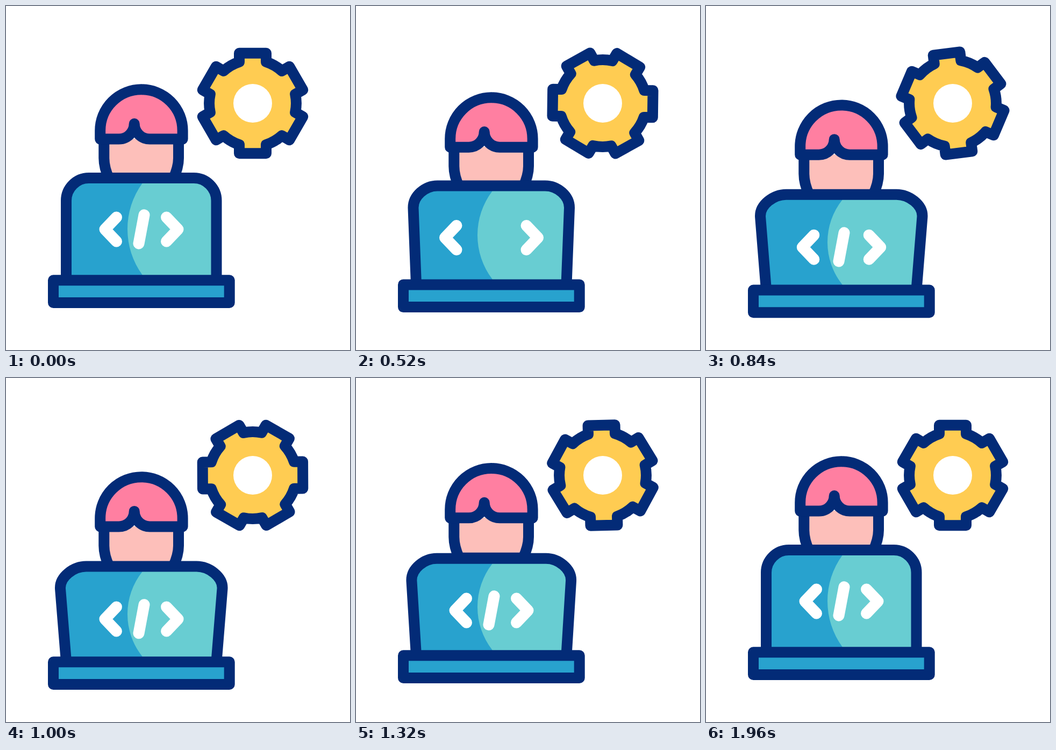
Recreate the animation shown at these times as an HTML page. Size 640x640 px, loop 2000 ms.

```html
<!DOCTYPE html>
<html lang="en">
<head>
<meta charset="utf-8">
<title>Developer at work</title>
<style>
  html, body { margin: 0; width: 100%; height: 100%; overflow: hidden; background: #fff; }
  svg { display: block; width: 100vw; height: 100vh; }
  .line { stroke: #032b77; stroke-width: 20; stroke-linecap: round; stroke-linejoin: round; }
  .code { fill: none; stroke: #fff; stroke-width: 21; stroke-linecap: round; stroke-linejoin: round; }
</style>
</head>
<body>
<svg viewBox="0 0 640 640">
  <defs><clipPath id="screenClip"><path id="clipShape"/></clipPath></defs>

  <g transform="translate(459 181)">
    <path id="gear" class="line" fill="#ffcc52"/>
    <circle r="36" fill="#fff"/>
  </g>

  <g id="head">
    <path class="line" fill="#fdbfba" d="M182.3 247V283C182.3 297 186 309 192 322H311C317 309 321 297 321 283V247"/>
    <path class="line" fill="#ff7fa1" d="M175.2 247.6V232A76.7 76.7 0 0 1 328.6 232V247.6H267.5A28.7 28.7 0 0 1 238.7 219A28.7 28.7 0 0 1 210 247.6Z"/>
  </g>

  <path id="screen" fill="#28a2ce"/>
  <path id="shine" fill="#68cdd2" clip-path="url(#screenClip)"/>
  <path id="frame" class="line" fill="none"/>

  <g id="code" class="code">
    <path id="less" d="M205.5 393L184 415.5L205.5 438"/>
    <path id="slash"/>
    <path id="greater" d="M298.5 393L320 415.5L298.5 438"/>
  </g>

  <rect id="base" class="line" x="88" y="510.3" width="327.7" height="41.7" fill="#28a2ce"/>
</svg>
<script>
const LOOP = 2000, STEP = 40;
const el = id => document.getElementById(id);
const set = (id, name, value) => el(id).setAttribute(name, value);
const move = (id, x, y) => set(id, 'transform', `translate(${x} ${y})`);

// Ease in and out from 0 to 1; power is the speed at the middle.
function ease(t, from, to, power = 2) {
  const x = Math.min(1, Math.max(0, (t - from) / (to - from)));
  const a = x ** power;
  return a / (a + (1 - x) ** power);
}

// Rise over [up, top], hold, then fall over [leave, down].
const pulse = (t, up, top, leave, down, power) =>
  ease(t, up, top, power) - ease(t, leave, down, power);

function gearPath() {
  const teeth = Array.from({ length: 6 }, (_, i) => {
    const a = i * Math.PI / 3, c = Math.cos(a), s = Math.sin(a);
    const at = (x, y) => `${x * c - y * s} ${x * s + y * c}`;
    return `${at(-25, -77)}L${at(-25, -93.2)}L${at(25, -93.2)}L${at(25, -77)}`;
  });
  return `M${teeth.join('A81 81 0 0 1 ')}A81 81 0 0 1 -25 -77Z`;
}

function screenPath(drop, flare, bottom) {
  const top = 320 + drop, shoulder = 362 + drop;
  const left = 112 - flare, right = 391.5 + flare;
  const inL = 154 - flare * .45, inR = 349.5 + flare * .45;
  const lean = flare * .15;
  return `M112 ${bottom}L${left} ${shoulder}C${left - lean} ${shoulder - 23} ${inL - 23} ${top} ${inL} ${top}` +
    `H${inR}C${inR + 23} ${top} ${right + lean} ${shoulder - 23} ${right} ${shoulder}L391.5 ${bottom}`;
}

function shinePath(top, bottom) {
  const chord = bottom - top, sag = 27.5;
  const r = (chord * chord / 4 + sag * sag) / (2 * sag);
  return `M253.5 ${top}A${r} ${r} 0 0 0 253.5 ${bottom}V${bottom + 12}H420V${top - 12}H253.5Z`;
}

function draw(t) {
  // The head and the screen each sink a little further than the base.
  const base = 18.3 * pulse(t, 180, 900, 900, 1620, 2.1);
  const nod = 11 * pulse(t, 100, 840, 1000, 1720);
  const tilt = 12.6 * pulse(t, 140, 900, 1020, 1880);
  const gap = 18.6 * pulse(t, 0, 500, 500, 1020, 1.7);
  const size = 1 - pulse(t, 120, 440, 520, 800);
  const drop = base + tilt;
  const outline = screenPath(drop, tilt * .87, 510 + base);

  set('gear', 'transform', `rotate(${180 * ease(t, 36, 1481, 2.3)})`);
  move('head', 0, base + nod);
  move('base', 0, base);
  for (const id of ['screen', 'clipShape', 'frame']) set(id, 'd', outline);
  set('shine', 'd', shinePath(330 + drop, 500 + base));

  move('code', 0, drop * 1.08);
  move('less', -gap, 0);
  move('greater', gap, 0);
  set('slash', 'd', `M${252 + 5 * size} ${415.3 - 26.6 * size}L${252 - 5 * size} ${415.3 + 26.6 * size}`);
  set('slash', 'visibility', size > .01 ? 'visible' : 'hidden');
}

set('gear', 'd', gearPath());
const start = performance.now();
function tick() {
  const step = Math.floor((performance.now() - start) % LOOP / STEP);
  draw(step < 2 ? 0 : step * STEP);
  requestAnimationFrame(tick);
}
tick();
</script>
</body>
</html>
```
